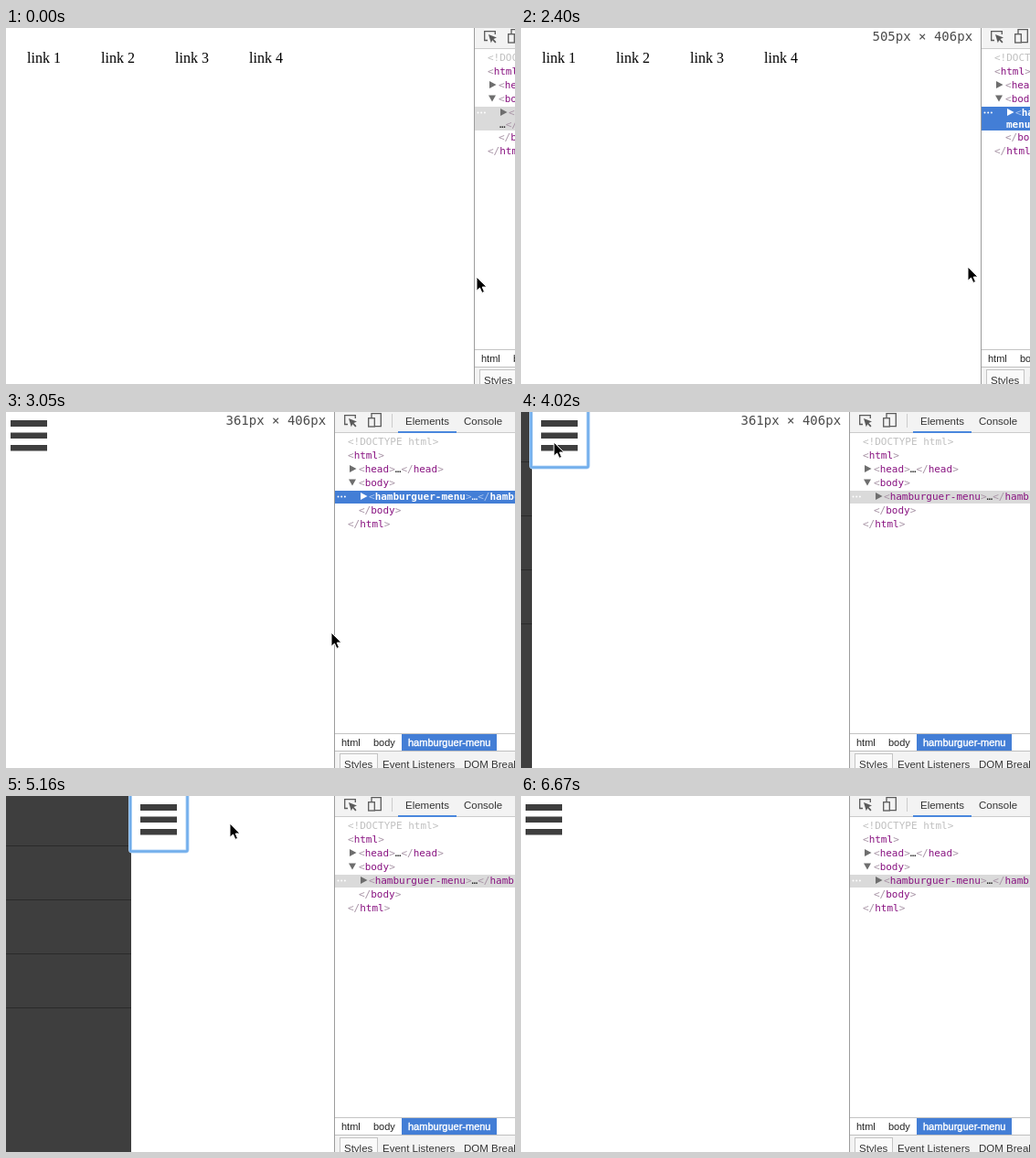
An HTML page for the animation above (7300 ms loop, 557x389 px).

```html
<!DOCTYPE html>
<html lang="en">
<head>
<meta charset="utf-8">
<title>Responsive menu</title>
<style>
  html, body { margin: 0; width: 100%; height: 100%; overflow: hidden; background: #fff; }
  svg { display: block; width: 557px; height: 389px; }
  text { white-space: pre; }
  .serif { font: 16px "Liberation Serif", serif; }
  .ui { font: 11.5px "Liberation Sans", sans-serif; fill: #333; }
  .crumb { font: 11px "Liberation Sans", sans-serif; fill: #222; }
  .code { font: 11px "DejaVu Sans Mono", monospace; fill: #222; }
  .size { font: 14px "DejaVu Sans Mono", monospace; fill: #4c4c4c; }
  .br { fill: #a894a6; }
  .tag { fill: #881280; }
  .arrow { fill: #6e6e6e; }
  .dots { fill: #fff; }
  .row { fill: #dadada; }
  .focused .row { fill: #437ed6; }
  .focused .node text, .focused .node .tag, .focused .node .arrow { fill: #fff; }
  .focused .node .br { fill: #a9c4ee; }
  .focused .node .tag { font-weight: bold; }
</style>
</head>
<body>
<svg viewBox="0 0 557 389">
  <defs>
    <clipPath id="labelClip"><rect id="labelBox" height="30"/></clipPath>
  </defs>
  <rect width="557" height="389" fill="#fff"/>
  <g id="wide" class="serif"></g>
  <g id="mobile">
    <g id="menu"></g>
    <g id="burger">
      <g id="ring" fill="none">
        <rect x="-1" y="-5" width="62.5" height="65.5" rx="2" stroke="#b5d6f7" stroke-width="4"/>
        <rect x="-1" y="-5" width="62.5" height="65.5" rx="1.5" stroke="#72aeec" stroke-width="2.4"/>
      </g>
      <path d="M10 9h40v7H10zM10 22.5h40v6.5H10zM10 36h40v6.5H10z" fill="#3e3e3e"/>
    </g>
  </g>
  <g id="status">
    <rect x="-6" y="384.5" width="121.5" height="20" rx="4" fill="#1c1c1c" stroke="#c8c8c8"/>
    <path d="M14 388.5H110" stroke="#999" stroke-dasharray="1 3 2 4"/>
  </g>
  <g clip-path="url(#labelClip)"><text id="label" class="size" y="14"></text></g>
  <g id="panel"></g>
  <g id="cursor">
    <path id="pointer" d="M0 0V15.2L3.5 12L5.9 17.4L8.5 16.3L6.2 11H11Z" fill="#000" stroke="#fff" stroke-width="1" stroke-linejoin="round"/>
    <path id="hand" d="M-1.3 1Q0 -.8 1.3 1L2 5.2Q3.4 4.4 4.3 5.6Q5.6 5 6.4 6.2Q8 6 8 8V10.5L6.4 14.5H-.4L-4.6 9.2Q-5 7.4 -3.2 7.5L-.7 9.2Z" fill="#fff" stroke="#000" stroke-linejoin="round"/>
  </g>
</svg>
<script>
const LOOP = 7300;
const SLIDE = 300;
const OPEN = 215, CLOSED = -5;
const $ = id => document.getElementById(id);

// time, x of the panel
const dragKeys = [[2250, 513], [2400, 504], [2640, 435], [2900, 361], [2990, 360]];

// time, x, y of the cursor
const cursorKeys = [
  [30, 515, 272], [370, 494, 267],
  [1150, 494, 267], [1440, 501, 259],
  [1620, 501, 259], [1830, 509, 264],
  [2250, 509, 264], [2400, 489, 261], [2640, 413, 257], [2900, 356, 241],
  [3320, 356, 241], [3520, 47, 48],
  [3700, 47, 48], [3900, 36, 33],
  [4430, 36, 33], [4630, 199, 35], [5060, 245, 30],
  [5660, 245, 30], [5820, 314, 152],
  [6180, 314, 152], [6660, 562, 392]
];

const linear = p => p;
const smooth = p => p * p * (3 - 2 * p);
const between = (t, a, b) => t >= a && t < b;
const show = (id, on) => $(id).setAttribute("display", on ? "inline" : "none");
const move = (id, x, y = 0) => $(id).setAttribute("transform", `translate(${x} ${y})`);

function track(keys, t, col, curve) {
  if (t <= keys[0][0]) return keys[0][col];
  const i = keys.findIndex(k => k[0] > t);
  if (i < 0) return keys[keys.length - 1][col];
  const a = keys[i - 1], b = keys[i];
  return a[col] + (b[col] - a[col]) * curve((t - a[0]) / (b[0] - a[0]));
}

// cubic-bezier(.25, .1, .25, 1)
function ease(p) {
  if (p <= 0) return 0;
  if (p >= 1) return 1;
  const bezier = (s, a, b) => 3 * a * s * (1 - s) ** 2 + 3 * b * s * s * (1 - s) + s ** 3;
  let lo = 0, hi = 1;
  for (let i = 0; i < 24; i++) {
    const mid = (lo + hi) / 2;
    if (bezier(mid, .25, .25) < p) lo = mid; else hi = mid;
  }
  return bezier(lo, .1, 1);
}

// right edge of the sliding menu
function menuEdge(t) {
  const slide = (start, from, to) => from + (to - from) * ease((t - start) / SLIDE);
  if (t < 3995) return slide(2415, OPEN, CLOSED);
  if (t < 5093) return slide(3995, CLOSED, OPEN);
  return slide(5093, OPEN, CLOSED);
}

const rect = (x, y, w, h, fill, more = "") =>
  `<rect x="${x}" y="${y}" width="${w}" height="${h}" fill="${fill}" ${more}/>`;
const text = (x, y, cls, body, more = "") => `<text x="${x}" y="${y}" class="${cls}" ${more}>${body}</text>`;
const br = s => `<tspan class="br">${s}</tspan>`;
const name = s => `<tspan class="tag">${s}</tspan>`;
const open = s => br("&lt;") + name(s) + br("&gt;");
const close = s => br("&lt;/") + name(s) + br("&gt;");
const right = (x, y) => `<path class="arrow" d="M${x} ${y - 4}l7.5 4l-7.5 4z"/>`;
const down = (x, y) => `<path class="arrow" d="M${x} ${y - 3.5}h8l-4 7z"/>`;

function buildPage() {
  const links = [1, 2, 3, 4].map(n => "link " + n);
  $("wide").innerHTML = links.map((s, i) => text(23 + 81 * i, 38, "serif", s)).join("");
  $("menu").innerHTML = rect(0, 0, OPEN, 389, "#3e3e3e") +
    rect(0, 0, OPEN, 54, "#292929", 'id="hover"') +
    links.map((s, i) => rect(0, 54 + 59 * i, OPEN, 1, "#2a2a2a") +
      text(15, 30 + 59 * i, "serif", s, 'fill="#fff" stroke="#fff" stroke-width=".25"')).join("");
}

function buildPanel() {
  const el = "hamburguer-menu";
  const first = body => text(37, 96, "code", body);
  const second = body => text(27, 109, "code", body);
  $("panel").innerHTML =
    rect(0, 0, 557, 389, "#fff") +
    // toolbar
    rect(0, 0, 557, 22, "#f3f3f3") + rect(0, 22, 557, 1, "#cccccc") +
    `<g fill="none" stroke="#5a5a5a" stroke-width="1.3">
      <path d="M14 13.5H10.7V3.7H22.3V7"/>
      <path d="M40 6V1.7H50.3V15.7H44"/><rect x="36.7" y="6.7" width="6.6" height="9.3"/>
    </g>
    <path d="M15 7l9 3.5l-3.5 1.5l3 3.2l-1.2 1.2l-3-3.2l-1.5 3z" fill="#5a5a5a"/>` +
    rect(62, 2, 1, 15, "#cccccc") +
    text(77, 14, "ui", "Elements") + text(141, 14, "ui", "Console") +
    rect(69, 21, 64, 2, "#4a87dd") +
    // document tree
    text(14, 36, "code", "&lt;!DOCTYPE html&gt;", 'style="fill:#c0c0c0"') +
    text(14, 51, "code", open("html")) +
    right(16, 62) + text(26, 66, "code", open("head") + "…" + close("head")) +
    down(15, 77) + text(26, 81, "code", open("body")) +
    `<g class="node"><rect id="row" class="row" y="86" width="557"/>` +
    [3.5, 7.2, 10.9].map(x => `<circle class="dots" cx="${x}" cy="92.5" r="1"/>`).join("") +
    right(28, 92) +
    `<g id="line">${first(open(el) + "…" + close(el))}</g>
    <g id="wrapA">${first(open(el)) + second("…" + close(el))}</g>
    <g id="wrapB">${first(br("&lt;") + name("hamburguer-")) +
      second(name("menu") + br("&gt;") + "…" + close(el))}</g></g>
    <g id="tail">${text(26, 111, "code", close("body")) + text(14, 126, "code", close("html"))}</g>` +
    // breadcrumbs
    rect(0, 351, 557, 1, "#c4c4c4") +
    text(7, 365, "crumb", "html") + text(42, 365, "crumb", "body") +
    rect(73, 352, 104, 18, "#437ed6") +
    text(80, 365, "crumb", el, 'style="fill:#fff;stroke:#fff;stroke-width:.4"') +
    // lower tabs
    rect(0, 370, 557, 19, "#f3f3f3") + rect(0, 370, 557, 1, "#c0c0c0") +
    rect(5.5, 373.5, 41, 20, "#fafafa", 'stroke="#c4c4c4"') +
    text(10, 389, "ui", "Styles") + text(52, 389, "ui", "Event Listeners") +
    text(141, 389, "ui", "DOM Breakpoints") +
    rect(-1, 0, 1, 389, "#9c9c9c");
}

function drawPanel(t) {
  const x = Math.round(track(dragKeys, t, 1, linear));
  const wrapped = x > 470;
  move("panel", x);
  $("panel").setAttribute("class", between(t, 1410, 3960) ? "focused" : "");
  show("line", !wrapped);
  show("wrapA", x > 508);
  show("wrapB", wrapped && x <= 508);
  $("row").setAttribute("height", wrapped ? 26 : 14);
  move("tail", 0, wrapped ? 12 : 0);

  // the size readout lags a little behind the drag
  const lag = t > 2415 ? 32 : 0;
  const width = Math.round(track(dragKeys, t - lag, 1, linear)) + 1;
  show("label", between(t, 2280, 4050));
  $("label").setAttribute("x", width - 120.5);
  $("label").textContent = `${width}px × 406px`;
  $("labelBox").setAttribute("width", x - 10);
}

function draw(t) {
  const dragging = between(t, 2250, 2900);
  const curve = dragging ? linear : smooth;
  const cx = track(cursorKeys, t, 1, curve), cy = track(cursorKeys, t, 2, curve);
  const mobile = t >= 2415;
  const edge = Math.round(menuEdge(t));
  const hover = between(t, 3995, 5093) && cx < edge && cy < 54;

  show("wide", !mobile);
  show("mobile", mobile);
  move("menu", edge - OPEN);
  move("burger", edge);
  show("ring", between(t, 3960, 5700));
  show("hover", hover);
  show("status", hover && t > 4400);
  drawPanel(t);

  move("cursor", Math.round(cx), Math.round(cy));
  show("pointer", !hover);
  show("hand", hover);
}

buildPage();
buildPanel();
const start = performance.now();
function tick() {
  draw((performance.now() - start) % LOOP);
  requestAnimationFrame(tick);
}
tick();
</script>
</body>
</html>
```
